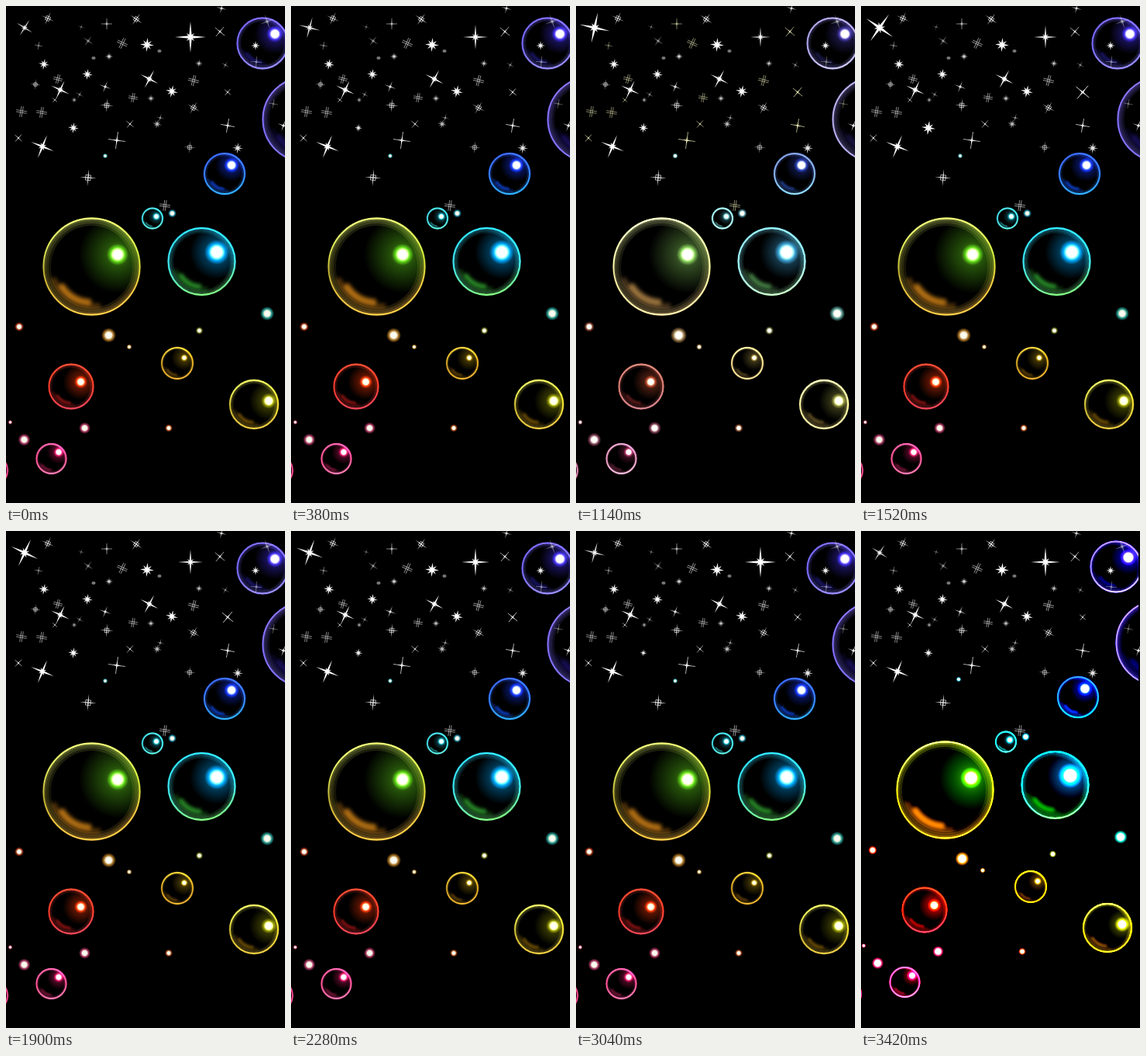
An HTML page with a canvas that plays this animation: 360 by 640 pixels, repeating every 3.8 s.

```html
<!DOCTYPE html>
<html lang="en">
<head>
<meta charset="utf-8">
<title>Bubbles and stars</title>
<style>
html, body { margin: 0; width: 100%; height: 100%; overflow: hidden; background: #000; }
canvas { position: absolute; left: 0; top: 0; }
#bubbles { animation: mood 3800ms step-end infinite; }
@keyframes mood {
  0%, 40%, 80% { filter: none; transform: none; }
  30%, 70% { filter: saturate(.58) brightness(1.02); }
  90% { filter: brightness(1.35) contrast(1.3) saturate(1.2); transform: translate(-2px, -2px); }
}
</style>
</head>
<body>
<canvas id="bubbles" width="360" height="640"></canvas>
<canvas id="stars" width="360" height="640"></canvas>
<script>
const STEP = 380, COUNT = 10, TAU = Math.PI * 2;
const bub = document.getElementById('bubbles').getContext('2d');
const sky = document.getElementById('stars').getContext('2d');

// x, y, radius, rim top / middle / bottom, glow, crescent, highlight x, y, radius
const bubbles = [
  [110.5, 335.5, 62.5, '210,232,105', '150,140,40', '238,176,62', '75,165,20', '225,140,25', 144, 320, 14],
  [252.5, 329, 43.5, '40,195,235', '50,190,195', '110,220,110', '0,150,225', '50,170,50', 272, 317, 16],
  [282, 216, 26.5, '50,90,240', '45,105,245', '40,150,255', '20,50,230', '15,70,220', 291, 205, 10],
  [331, 48, 33, '105,90,225', '95,85,215', '130,120,240', '55,40,200', '30,25,120', 347, 36, 11],
  [386, 146, 55, '120,100,230', '105,90,215', '110,100,230', '50,30,180', '30,20,110', 416, 132, 13],
  [189, 273.5, 13.5, '60,190,195', '50,175,185', '80,205,195', '20,140,155', '30,130,130', 194, 271, 5.5],
  [221, 460, 20.5, '205,175,50', '165,125,25', '200,150,40', '130,105,5', '120,80,5', 230, 453, 5],
  [320, 513, 31.5, '205,215,85', '165,150,40', '200,170,55', '120,125,5', '125,90,5', 339, 508.5, 10],
  [84, 490, 29, '230,65,45', '195,45,35', '210,60,75', '205,45,5', '150,20,20', 96.5, 484, 8.5],
  [58.5, 583, 19.5, '235,85,145', '215,65,120', '240,105,155', '190,20,85', '160,25,75', 68, 574.5, 7],
  [-17.5, 598, 20, '230,70,130', '220,60,120', '220,60,120', '0,0,0', '0,0,0', -8, 590, 1]
];
// x, y, radius, colour
const dots = [
  [128, 193, 3.3, '50,215,235'], [214.5, 267, 5.5, '30,190,230'], [337, 396, 9, '50,220,205'],
  [17, 413, 6, '240,75,30'], [132.5, 424, 9.5, '240,160,45'], [249.5, 418, 5, '135,145,20'],
  [159, 439, 3.5, '235,160,35'], [210, 543.5, 5, '235,95,25'], [5.5, 536, 3, '240,75,130'],
  [23.5, 558.5, 8, '240,75,140'], [101.5, 543.5, 7.5, '240,70,135']
];

function spot(x, y, r, stops) {
  const g = bub.createRadialGradient(x, y, 0, x, y, r);
  stops.forEach(([at, colour]) => g.addColorStop(at, colour));
  bub.fillStyle = g;
  bub.fillRect(x - r, y - r, 2 * r, 2 * r);
}

function light(x, y, r, rgb) {
  spot(x, y, r, [[0, '#fff'], [.42, 'rgba(255,255,235,.96)'], [.68, `rgba(${rgb},.65)`], [1, `rgba(${rgb},0)`]]);
}

function ring(x, y, r, width, alpha, from = 0, to = TAU) {
  bub.globalAlpha = alpha;
  bub.lineWidth = width;
  bub.beginPath();
  bub.arc(x, y, r, from, to);
  bub.stroke();
}

function drawBubble([x, y, r, top, mid, low, glow, moon, hx, hy, hr], soft) {
  bub.save();
  bub.beginPath();
  bub.arc(x, y, r + 1, 0, TAU);
  bub.clip();
  bub.globalCompositeOperation = 'lighter';

  spot(hx, hy, r * .8, [[0, `rgba(${glow},.85)`], [.35, `rgba(${glow},.45)`], [1, `rgba(${glow},0)`]]);

  bub.save();
  bub.filter = `blur(${r * .045}px)`;
  bub.strokeStyle = `rgb(${moon})`;
  bub.lineCap = 'round';
  ring(x, y, r * .73, r * .12, .75, 1.65, 2.55);
  ring(x, y, r * .82, r * .1, .4, 1.4, 2.8);
  bub.restore();

  const g = bub.createLinearGradient(x - r * .25, y - r, x + r * .05, y + r);
  g.addColorStop(0, `rgb(${top})`);
  g.addColorStop(.5, `rgb(${mid})`);
  g.addColorStop(1, `rgb(${low})`);
  bub.strokeStyle = g;
  for (const w of [.32, .22, .12]) ring(x, y, r, r * w, .14);
  ring(x, y, r - .5, 1.8, .85);
  if (soft) {
    bub.strokeStyle = '#aaa';
    ring(x, y, r - .6, 2.2, .3);
  }
  bub.globalAlpha = 1;
  light(hx, hy, hr, glow);
  bub.restore();
}

function drawBubbles(soft) {
  bub.fillStyle = '#000';
  bub.fillRect(0, 0, 360, 640);
  bubbles.forEach(b => drawBubble(b, soft));
  dots.forEach(([x, y, r, rgb]) => light(x, y, soft ? r * 1.12 : r, rgb));
}

// x, y, radius, turn in degrees, brightness
const stars = {
  spark: [
    [70, 108, 13, 25, 1], [185, 94, 13, 28, 1], [47, 181, 16, 22, 1], [278, 3, 7, 15, .7],
    [337, 20, 10, 70, .4], [358, 154, 8, 20, .8], [106, 45, 8, 35, .4], [97, 27, 5, 20, .35],
    [128, 104, 8, 20, .75], [199, 144, 6, 15, .5], [95, 114, 6, 30, .4], [283, 76, 6, 30, .4]
  ],
  burst: [
    [182, 50, 9, 5, .95], [49, 75, 7, 10, .9], [105, 88, 7, 8, .9], [214, 110, 8, 12, .95],
    [299, 183, 7, 5, .7], [133, 65, 5, 0, .6], [322, 51, 6, 0, .8], [187, 119, 5, 0, .5],
    [249, 74, 5, 10, .5], [88, 121, 4, 0, .4], [195, 152, 6, 15, .5]
  ],
  ringed: [
    [54, 16, 9, 25, .8], [168, 17, 9, 35, .85], [106, 221, 11, 5, .85], [130, 128, 9, 5, .8],
    [242, 131, 9, 30, .8], [38, 101, 7, 8, .75], [237, 182, 8, 5, .7]
  ],
  grid: [
    [150, 48, 7, 25, .7], [20, 136, 7, 10, .65], [46, 137, 7, 10, .65], [164, 118, 6, 10, .65],
    [67, 94, 6, 15, .65], [242, 96, 7, 15, .7], [205, 257, 7, 8, .7]
  ],
  line: [
    [130, 23, 7, 0, .65], [143, 173, 11, 8, .85], [286, 154, 9, 10, .85], [16, 170, 6, 42, .75],
    [160, 152, 6, 40, .65], [63, 121, 4, 40, .6], [276, 33, 8, 40, .75], [42, 51, 5, 10, .45],
    [323, 72, 7, 5, .4], [345, 126, 6, 10, .35]
  ]
};

// One radius per step
const twinkles = [
  { kind: 'spark', x: 24, y: 28, size: [12, 14, 18, 20, 21, 19, 18, 16, 14, 12], turn: [32, 15, 3, 12, 35, 25, 20, 2, 15, 33] },
  { kind: 'spark', x: 238, y: 40, size: [20, 16, 12, 13, 15, 16, 18, 19, 20, 19], turn: [0] },
  { kind: 'burst', x: 87, y: 157, size: [7, 5, 4, 6.5, 9, 7, 5.5, 3.5, 4.5, 6], turn: [8] },
  { kind: 'line', x: 286, y: 111, size: [5, 6, 8, 8, 11, 9, 8, 7, 6, 5], turn: [40] }
];

function spikes(n, r, base, turn = 0) {
  sky.beginPath();
  for (let i = 0; i < n * 2; i++) {
    const a = turn + i * Math.PI / n, d = i % 2 ? base : r;
    sky.lineTo(Math.cos(a) * d, Math.sin(a) * d);
  }
  sky.fill();
}

function cross(r, gap) {
  sky.beginPath();
  for (const d of gap ? [-gap, gap] : [0]) {
    sky.moveTo(-r, d); sky.lineTo(r, d);
    sky.moveTo(d, -r); sky.lineTo(d, r);
  }
  sky.stroke();
}

const shapes = {
  spark(r) {
    spikes(4, r, r * .12);
    spikes(4, r * .35, r * .1, Math.PI / 4);
  },
  burst(r) {
    spikes(4, r, r * .25);
    spikes(4, r * .85, r * .22, Math.PI / 4);
  },
  ringed(r) {
    spikes(4, r, r * .1);
    sky.strokeRect(-r * .3, -r * .3, r * .6, r * .6);
  },
  grid(r) { cross(r, 1.2); },
  line(r) {
    cross(r);
    spikes(4, r * .5, r * .12);
  }
};

function drawStar(kind, x, y, r, turn, alpha, soft) {
  const thin = kind === 'grid' || kind === 'line';
  sky.save();
  sky.translate(x, y);
  sky.rotate(turn * TAU / 360);
  sky.globalAlpha = alpha;
  sky.lineWidth = .75;
  sky.fillStyle = sky.strokeStyle = soft && thin ? '#eeeebb' : '#fff';
  shapes[kind](r);
  sky.restore();
}

function drawStars(step, soft) {
  sky.clearRect(0, 0, 360, 640);
  for (const kind in stars) stars[kind].forEach(s => drawStar(kind, ...s, soft));
  for (const { kind, x, y, size, turn } of twinkles) {
    const r = size[step];
    const alpha = .5 + .5 * r / Math.max(...size);
    drawStar(kind, x, y, r, turn[step % turn.length], alpha, soft);
  }
  sky.fillStyle = '#777';
  for (const [x, y] of [[113, 67], [198, 58]]) {
    sky.beginPath();
    sky.ellipse(x, y, 2.6, 2, 0, 0, TAU);
    sky.fill();
  }
}

const start = performance.now();
let last = -1, wasSoft = null;

function tick() {
  const step = Math.floor(Math.max(0, performance.now() - start) / STEP) % COUNT;
  if (step !== last) {
    const soft = step === 3 || step === 7;
    if (soft !== wasSoft) drawBubbles(soft);
    drawStars(step, soft);
    last = step;
    wasSoft = soft;
  }
  requestAnimationFrame(tick);
}
tick();
</script>
</body>
</html>
```
